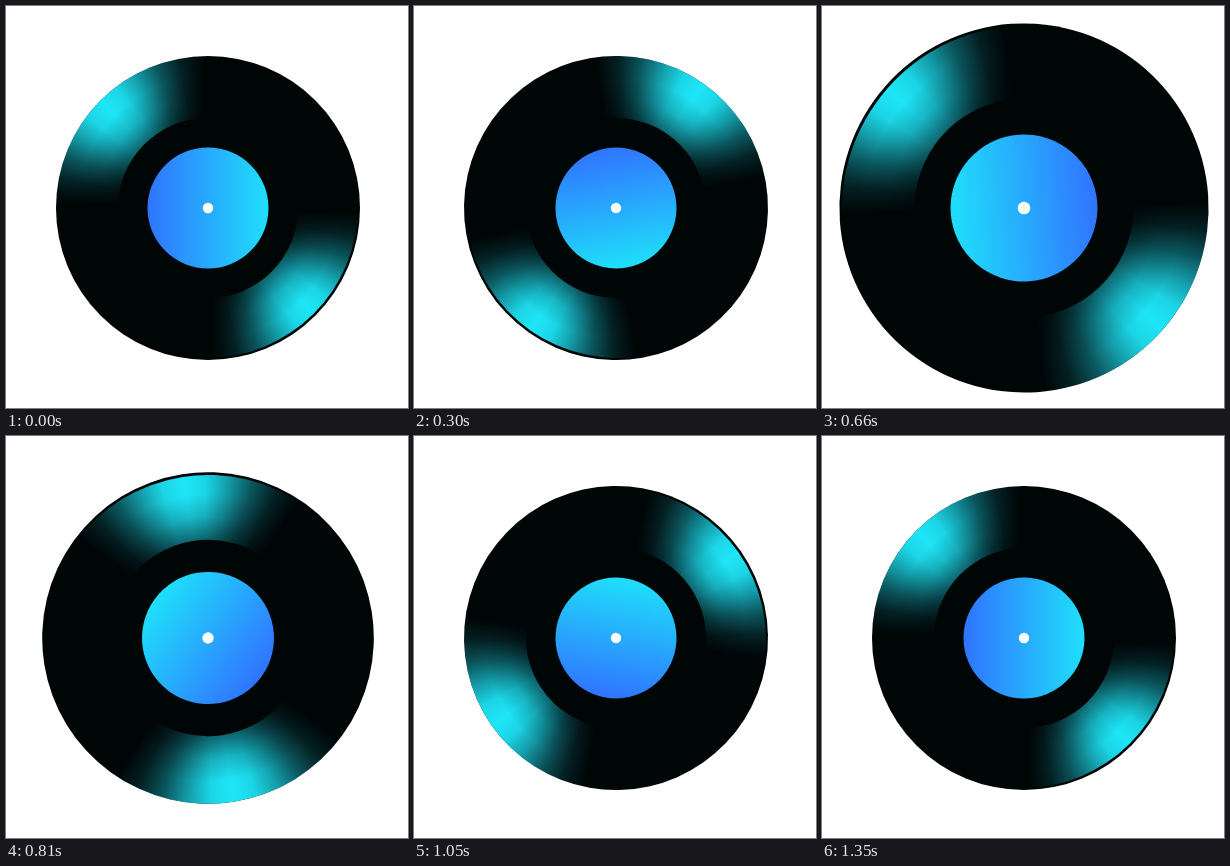
An HTML page with a canvas for the animation above (1380 ms loop, 402 by 402 pixels).

```html
<!DOCTYPE html>
<html lang="en">
<head>
<meta charset="utf-8">
<title>Spinning record</title>
<style>
  html, body { margin: 0; width: 100%; height: 100%; overflow: hidden; background: #fff; }
  canvas { display: block; width: 402px; height: 402px; }
</style>
</head>
<body>
<canvas width="402" height="402"></canvas>
<script>
const ctx = document.querySelector('canvas').getContext('2d');
const TAU = Math.PI * 2;
const RAD = Math.PI / 180;
const LOOP = 1380, TURN = 1350, STEP = 30;
const CENTER = 202;
const DISC = 152, GROOVE = 90, LABEL = 60.5, HOLE = 5.2;
const PULSE = { peak: 682, half: 206, gain: 0.24 };

// Half of the sheen profile: [degrees from its axis, opacity]
const FALLOFF = [[0, 1], [8, 0.92], [16, 0.68], [25, 0.36], [34, 0.12], [43, 0]];

function circle(r, fill, x = 0, y = 0) {
  ctx.beginPath();
  ctx.arc(x, y, r, 0, TAU);
  ctx.fillStyle = fill;
  ctx.fill();
}

function makeSheen() {
  const g = ctx.createConicGradient(0, 0, 0);
  for (const axis of [45, 225]) {
    for (const side of [-1, 1]) {
      for (const [deg, alpha] of FALLOFF) {
        g.addColorStop((axis + side * deg) / 360, `rgba(30, 230, 248, ${alpha})`);
      }
    }
  }
  return g;
}

function makeShade() {
  const g = ctx.createRadialGradient(0, 0, GROOVE, 0, 0, 132);
  g.addColorStop(0, 'rgba(0, 4, 6, 0.55)');
  g.addColorStop(0.5, 'rgba(0, 4, 6, 0.2)');
  g.addColorStop(1, 'rgba(0, 4, 6, 0)');
  return g;
}

function makeLabel() {
  const g = ctx.createLinearGradient(-LABEL, 0, LABEL, 0);
  g.addColorStop(0, '#3074ff');
  g.addColorStop(1, '#1fdffa');
  return g;
}

const sheen = makeSheen(), shade = makeShade(), label = makeLabel();

function scaleAt(t) {
  const near = 1 - Math.abs(t - PULSE.peak) / PULSE.half;
  return 1 + PULSE.gain * Math.max(0, near);
}

function draw(t) {
  const s = scaleAt(t);
  ctx.setTransform(1, 0, 0, 1, 0, 0);
  ctx.fillStyle = '#fff';
  ctx.fillRect(0, 0, 402, 402);
  ctx.translate(CENTER, CENTER);
  ctx.scale(s, s);
  ctx.rotate(t / TURN * 360 * RAD);

  circle(DISC, '#000506');
  // The sheen sits slightly off centre, leaving a dark rim on one side
  ctx.save();
  ctx.beginPath();
  ctx.arc(0, 0, DISC, 0, TAU);
  ctx.clip();
  circle(DISC, sheen, -1.8, -1.8);
  circle(DISC, shade);
  ctx.restore();
  circle(GROOVE, '#000506');
  circle(LABEL, label);
  circle(HOLE, '#fff');
}

const start = performance.now();
function tick() {
  const t = (performance.now() - start) % LOOP;
  draw(Math.floor(t / STEP) * STEP);
  requestAnimationFrame(tick);
}
tick();
</script>
</body>
</html>
```
